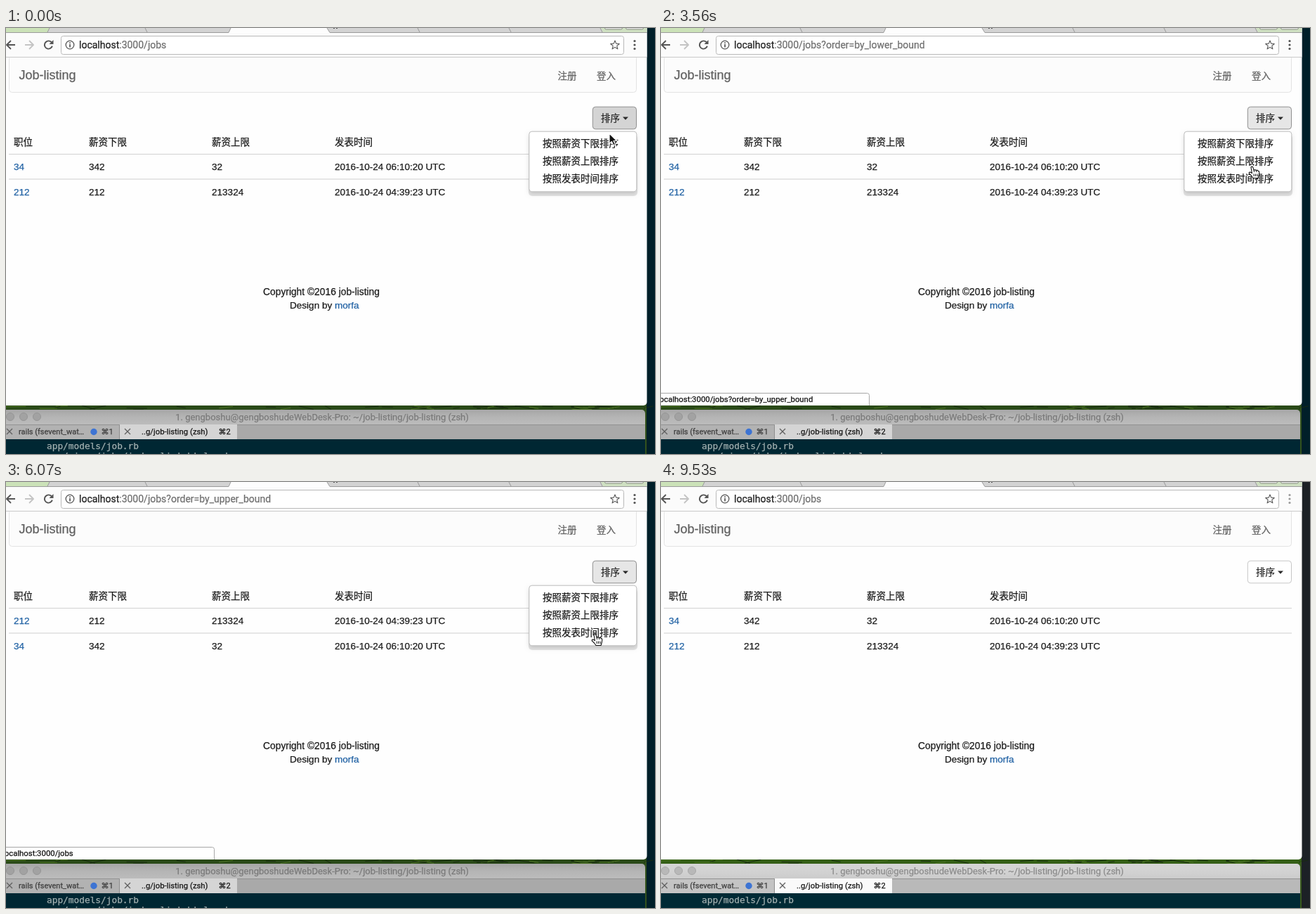
These frames come from a looping animation (924 px wide and 606 px high, 9.63 s). An HTML page with a canvas:

```html
<!DOCTYPE html>
<html lang="zh">
<head>
<meta charset="utf-8">
<title>Job-listing</title>
<style>
html, body { margin: 0; width: 100%; height: 100%; overflow: hidden; background: #fff; }
canvas { display: block; width: 924px; height: 606px; }
</style>
</head>
<body>
<canvas id="stage" width="924" height="606"></canvas>
<script>
const ctx = document.getElementById('stage').getContext('2d');
const LOOP = 9630;
const PAGE = '"Liberation Sans", "Noto Sans CJK SC", "Noto Sans CJK", sans-serif';
const HAN = '"Noto Sans CJK SC", "Noto Sans CJK", sans-serif';
const UI = 'Roboto, "DejaVu Sans", sans-serif';
const MONO = '"DejaVu Sans Mono", monospace';
const INK = '#1c1c1c', LINK = '#2162a4';
const LOWER = '?order=by_lower_bound', UPPER = '?order=by_upper_bound';
const ROWS = [
  ['34', '342', '32', '2016-10-24 06:10:20 UTC'],
  ['212', '212', '213324', '2016-10-24 04:39:23 UTC']
];
const COLS = [11, 118, 293, 468];

// Cursor moves: first step, last step, step count, end point
const START = [859, 150];
const MOVES = [
  [140, 590, 4, 858, 162],
  [890, 1620, 6, 861, 137],
  [2820, 3560, 6, 842, 197],
  [4140, 5030, 7, 852.2, 133],
  [5480, 6220, 6, 838.6, 218.5],
  [6520, 7420, 7, 904, 570],
  [8160, 9200, 8, 905, 614]
];

const within = (t, a, b) => t >= a && t < b;

function cursorAt(t) {
  let [x, y] = START;
  for (const [a, b, n, tx, ty] of MOVES) {
    if (t < a) break;
    const step = Math.min(n, Math.floor((t - a + 5) / ((b - a) / (n - 1))) + 1);
    const e = 1 - (1 - step / n) ** 2;
    x += (tx - x) * e;
    y += (ty - y) * e;
  }
  return [Math.round(x), Math.round(y)];
}

// A hairline stroke gives the heavier look of desktop font smoothing
function text(s, x, y, size, color, font = PAGE, align = 'left') {
  ctx.font = size + 'px ' + font;
  ctx.fillStyle = ctx.strokeStyle = color;
  ctx.textAlign = align;
  ctx.lineWidth = .25;
  ctx.lineJoin = 'round';
  ctx.fillText(s, x, y);
  ctx.strokeText(s, x, y);
  return ctx.measureText(s).width;
}

function rect(x, y, w, h, color) {
  ctx.fillStyle = color;
  ctx.fillRect(x, y, w, h);
}

function box(x, y, w, h, r, fill, stroke) {
  ctx.beginPath();
  ctx.roundRect(x, y, w, h, r);
  if (fill) { ctx.fillStyle = fill; ctx.fill(); }
  if (stroke) { ctx.strokeStyle = stroke; ctx.lineWidth = 1; ctx.stroke(); }
}

function line(points, color, width = 1) {
  ctx.beginPath();
  for (let i = 0; i < points.length; i += 2) ctx.lineTo(points[i], points[i + 1]);
  ctx.strokeStyle = color;
  ctx.lineWidth = width;
  ctx.stroke();
}

function shape(points, fill, stroke) {
  ctx.beginPath();
  for (let i = 0; i < points.length; i += 2) ctx.lineTo(points[i], points[i + 1]);
  ctx.closePath();
  if (fill) { ctx.fillStyle = fill; ctx.fill(); }
  if (stroke) { ctx.strokeStyle = stroke; ctx.lineWidth = 1.1; ctx.stroke(); }
}

function disc(x, y, r, fill, stroke, width = 1) {
  ctx.beginPath();
  ctx.arc(x, y, r, 0, 7);
  if (fill) { ctx.fillStyle = fill; ctx.fill(); }
  if (stroke) { ctx.strokeStyle = stroke; ctx.lineWidth = width; ctx.stroke(); }
}

function desktop(last) {
  rect(0, 0, 924, 606, last ? '#1c2126' : '#001f29');
  rect(0, 530, 912, 16, last ? '#345f16' : '#2a4a18');
  let seed = 7;
  const rnd = () => (seed = seed * 16807 % 2147483647) / 2147483647;
  for (let i = 0; i < 45; i++) {
    const x = rnd() * 912, w = 8 + rnd() * 22;
    line([x, 537 + rnd() * 6, x + w, 537 + rnd() * 6], i % 3 ? '#182b10' : '#4c7422');
  }
  rect(910, 540, 2, 66, last ? '#3a5a1e' : '#33521c');
}

function tabStrip() {
  rect(0, 0, 913, 6, '#d3d3d3');
  shape([0, 0, 62, 0, 59, 6, 0, 6], '#cbe2b8');
  shape([320, 0, 457, 0, 461, 6, 317, 6], '#fdfdfd');
  shape([847, 0, 913, 0, 913, 6, 850, 6], '#cfe0c2');
  line([0, 6.5, 317, 6.5, 320, 0], '#9b9b9b');
  line([457, 0, 461, 6.5, 913, 6.5], '#9b9b9b');
  line([62, 0, 59, 6], '#999');
  for (const x of [198, 586, 716, 846]) line([x, 0, x + 3, 6], '#999');
  box(852.5, -5, 25, 7, 2, '#dedede', '#8b9683');
  box(882.5, -5, 25, 7, 2, '#dedede', '#8b9683');
  rect(466, 0, 2, 1, '#555');
  rect(470, 0, 2, 1, '#555');
}

function toolbar(url, last) {
  rect(0, 7, 913, 34, '#fbfbfb');
  rect(0, 41, 913, 1, '#c9c9c9');
  line([13, 24, 1, 24], '#555', 1.8);
  line([7, 18, 1, 24, 7, 30], '#555', 1.8);
  line([27, 24, 39, 24], '#c4c4c4', 1.8);
  line([33, 18, 39, 24, 33, 30], '#c4c4c4', 1.8);
  ctx.beginPath();
  ctx.arc(60.5, 24, 5.6, .3, 5.6);
  ctx.strokeStyle = '#555';
  ctx.lineWidth = 1.9;
  ctx.stroke();
  shape([67.5, 17, 67.5, 23, 61.5, 23], '#555');

  box(78.5, 11.5, 801, 26, 3, '#fff', '#b9b9b9');
  disc(91, 24, 5.8, null, '#555', 1.3);
  rect(90.2, 23, 1.7, 4.5, '#555');
  rect(90.2, 20.3, 1.7, 1.7, '#555');
  const w = text('localhost', 104, 29, 14, '#202020', UI);
  text(':3000/jobs' + url, 104 + w, 29, 14, '#707070', UI);

  const star = [];
  for (let i = 0; i < 10; i++) {
    const r = i % 2 ? 2.9 : 6.6, a = i * Math.PI / 5 - Math.PI / 2;
    star.push(867 + r * Math.cos(a), 24.5 + r * Math.sin(a));
  }
  shape(star, null, '#555');
  for (const y of [18.5, 24, 29.5]) disc(895, y, 1.6, last ? '#9a9a9a' : '#505050');
}

function page(reversed) {
  box(4.5, 42.5, 893, 49, [0, 0, 4, 4], '#fcfcfc', '#e3e3e3');
  rect(5, 42, 892, 1, '#fcfcfc');
  text('Job-listing', 18.5, 73, 18, '#606060');
  text('注册', 785.5, 72.5, 13.5, '#626262', HAN);
  text('登入', 841, 72.5, 13.5, '#626262', HAN);

  ['职位', '薪资下限', '薪资上限', '发表时间'].forEach((s, i) =>
    text(s, COLS[i], 166.5, 13.5, INK, HAN));
  rect(4, 179, 894, 1, '#d2d2d2');
  rect(4, 214.5, 894, 1, '#d0d0d0');
  const rows = reversed ? [ROWS[1], ROWS[0]] : ROWS;
  rows.forEach((row, r) => row.forEach((s, i) =>
    text(s, COLS[i], 202 + r * 35.5, 13.55, i ? INK : LINK)));

  text('Copyright ©2016 job-listing', 449, 380, 13.8, INK, PAGE, 'center');
  const w = text('Design by ', 404, 399, 13.55, INK);
  text('morfa', 404 + w, 399, 13.55, LINK);
}

function sortButton(open, ring, shade) {
  if (ring) {
    ctx.save();
    ctx.shadowColor = '#4a97e6';
    ctx.shadowBlur = 4;
    box(834.5, 111.5, 63, 33, 4, '#5a9fe4');
    ctx.restore();
  }
  box(835.3, 112.2, 62.2, 31.6, 4, shade, ring ? '#5a9fe4' : open ? '#8f8f8f' : '#c6c6c6');
  if (ring) { ctx.lineWidth = 2.4; ctx.stroke(); }
  text('排序', 847, 133, 13.5, '#2a2a2a', HAN);
  shape([878, 126.5, 886, 126.5, 882, 130.8], '#2a2a2a');
}

function menu() {
  box(744, 152, 155, 87, 5, 'rgba(0,0,0,.1)');
  ctx.save();
  ctx.shadowColor = 'rgba(0,0,0,.15)';
  ctx.shadowBlur = 6;
  ctx.shadowOffsetY = 3;
  box(744.8, 147.2, 153, 85.6, 4, '#fff');
  ctx.restore();
  box(744.8, 147.2, 153, 85.6, 4, '#fff', '#bdbdbd');
  ['薪资下限', '薪资上限', '发表时间'].forEach((s, i) =>
    text('按照' + s + '排序', 764, 169 + i * 25, 13.5, INK, HAN));
}

function statusBar(query) {
  box(-6.5, 519.5, 303, 24, 3, '#fff', '#a6a6a6');
  text('localhost:3000/jobs' + query, -5, 532, 11.35, '#111', UI);
}

function cross(x, color) {
  line([x - 4, 570, x + 4, 578], color, 1.2);
  line([x + 4, 570, x - 4, 578], color, 1.2);
}

function terminal(last, more) {
  const bar = ctx.createLinearGradient(0, 543, 0, 565);
  bar.addColorStop(0, last ? '#d4d4d4' : '#a6a6a6');
  bar.addColorStop(.5, last ? '#d2d2d2' : '#b5b5b5');
  bar.addColorStop(1, last ? '#cbcbcb' : '#bcbcbc');
  box(-6, 543, 916, 30, 5, bar);
  for (const x of [6, 25, 44]) disc(x, 553, 5.5, last ? '#b8b8b8' : '#a2a2a2', last ? '#a8a8a8' : '#969696');
  text('1. gengboshu@gengboshudeWebDesk-Pro: ~/job-listing/job-listing (zsh)',
    450, 558, 13, last ? '#8b8b8b' : '#7a7a7a', UI, 'center');

  rect(0, 564, 910, 21, last ? '#b9b9b9' : '#a9a9a9');
  rect(0, 564, 910, 1, '#929292');
  rect(0, 565, 161, 20, last ? '#c4c4c4' : '#b2b2b2');
  rect(161, 565, 1, 20, '#8d8d8d');
  rect(162, 564, 167, 21, last ? '#fafafa' : '#d5d5d5');
  cross(5, '#606060');
  text('rails (fsevent_wat…', 18, 578, 11, '#3c3c3c', UI);
  disc(125, 574.5, 4.7, '#3d74d3');
  text('⌘1', 135.5, 578, 11, '#3c3c3c', UI);
  cross(173, '#606060');
  text('..g/job-listing (zsh)', 193, 578, 11.35, '#161616', UI);
  text('⌘2', 302.5, 578, 11, '#161616', UI);

  rect(0, 585, 910, 21, last ? '#002a35' : '#002733');
  text('app/models/job.rb', 58, 599, 12.8, '#a3b0b0', MONO);
  if (more) text('app/views/jobs/index_list.html.erb', 58, 613, 12.8, '#a3b0b0', MONO);
}

function arrow(x, y) {
  ctx.save();
  ctx.translate(x, y);
  shape([0, 0, 0, 14.5, 3.4, 11.4, 6, 17, 8.4, 15.9, 6, 10.5, 10.6, 10.5], '#111', '#fff');
  ctx.restore();
}

function hand(x, y) {
  ctx.save();
  ctx.translate(x, y);
  ctx.lineJoin = 'round';
  shape([-2, 1, -.8, 0, .6, .6, 2, 5.2, 4, 4.6, 5.2, 5.4, 7, 5.2, 8, 6.4, 9.2, 6.6,
    9.8, 8.5, 9.2, 12.5, 8, 16.5, 1, 16.5, -1.5, 13, -4.8, 9.8, -4.6, 8.2, -3, 8, -.6, 9.6], '#fff', '#111');
  for (const i of [2, 4.4, 6.8]) line([i, 10.5, i + .3, 14], '#111');
  line([2, 5.2, 2.6, 8], '#111');
  line([5.2, 5.4, 5.6, 8], '#111');
  ctx.restore();
}

function render(t) {
  const last = t >= 9530;
  const open = t < 890 || within(t, 1620, 3850) || within(t, 5030, 6520);
  const ring = within(t, 1480, 1620) || within(t, 4880, 5030);
  const pointing = within(t, 140, 6670);
  const [x, y] = cursorAt(t);
  const url = within(t, 890, 3850) ? LOWER : within(t, 3850, 6520) ? UPPER : '';

  let status = null;
  if (open && pointing && y >= 152) status = [LOWER, UPPER, ''][Math.floor((y - 152) / 25)];
  else if (within(t, 890, 1040)) status = LOWER;
  else if (within(t, 3850, 4140)) status = UPPER;
  else if (within(t, 6520, 6670)) status = '';

  const over = y < 145;
  let shade = '#fff';
  if (ring || (open && (over || t < 140))) shade = '#d4d4d4';
  else if (open || (over && t >= 1330)) shade = '#e6e6e6';

  desktop(last);
  ctx.save();
  ctx.beginPath();
  ctx.roundRect(0, -10, 912.5, 547, [0, 0, 5, 0]);
  ctx.clip();
  rect(0, 0, 913, 537, '#fefefe');
  tabStrip();
  toolbar(url, last);
  page(within(t, 3850, 6520));
  sortButton(open, ring, shade);
  if (open) menu();
  if (status !== null) statusBar(status);
  ctx.restore();
  terminal(last, t < 9050);
  if (pointing) hand(x, y);
  else if (!last) arrow(x, y);
}

const begin = performance.now();
function tick() {
  render((performance.now() - begin) % LOOP);
  requestAnimationFrame(tick);
}
tick();
</script>
</body>
</html>
```
